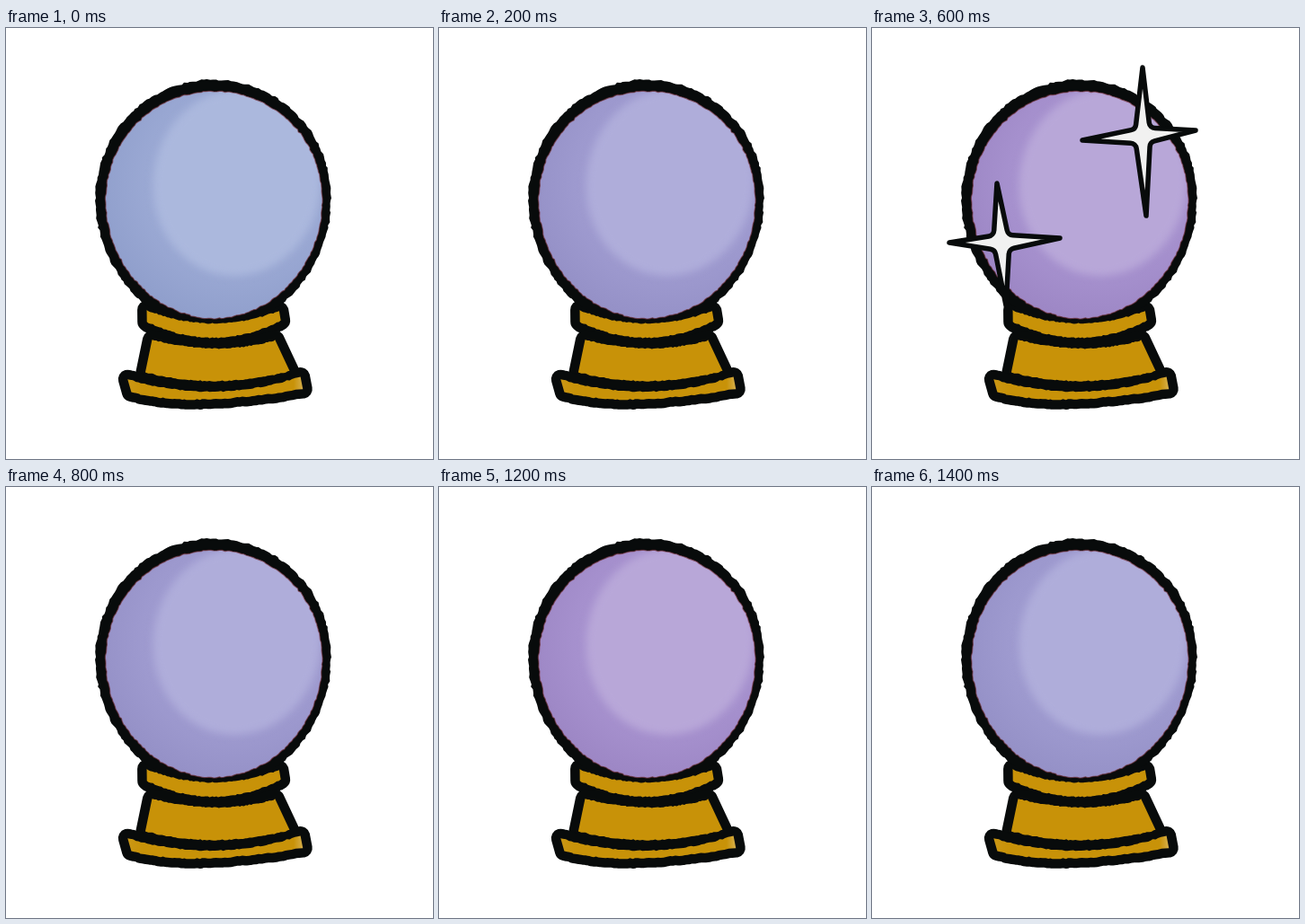
These frames come from a looping animation (475 px wide and 480 px high, 1.6 s). An HTML page with a canvas:

```html
<!DOCTYPE html>
<html lang="en">
<head>
<meta charset="utf-8">
<title>Crystal ball</title>
<style>
html, body { margin: 0; width: 100%; height: 100%; overflow: hidden; background: #fff; }
canvas { display: block; }
</style>
</head>
<body>
<canvas id="stage" width="475" height="480"></canvas>
<script>
const ctx = document.getElementById('stage').getContext('2d');
const INK = '#080b0b';
const STEP = 200;

// light, shade and deep tone of the glass
const BLUE = ['#abb8dd', '#9ba9d4', '#909fcc'];
const VIOLET = ['#afadda', '#9f9bd0', '#9591c7'];
const PURPLE = ['#b8a7d8', '#a792cf', '#9d87c5'];
const tones = [BLUE, VIOLET, PURPLE, PURPLE, VIOLET, PURPLE, PURPLE, VIOLET];
const sparkles = step => step === 3 || step === 5;

let seed = 77;
const rnd = () => (seed = seed * 16807 % 2147483647) / 2147483647 - 0.5;

// Closed path along at(t), t from 0 to 1, with an uneven hand-inked edge
function trace(at, steps, rough) {
  const path = new Path2D();
  for (let i = 0; i < steps; i++) {
    const [x, y] = at(i / steps);
    path.lineTo(x + rnd() * rough, y + rnd() * rough);
  }
  path.closePath();
  return path;
}

// Ellipse that is a little fuller at the top
const egg = (cx, cy, rx, ry, rough) => trace(t => {
  const a = t * 2 * Math.PI;
  return [cx + rx * Math.cos(a) * (1 - 0.035 * Math.sin(a)), cy + ry * Math.sin(a)];
}, 260, rough);

const quad = (a, b, c, t) =>
  [0, 1].map(k => (1 - t) ** 2 * a[k] + 2 * t * (1 - t) * b[k] + t * t * c[k]);

// Ring of the stand: sagging top edge, then sagging bottom edge back
const ring = (top, bottom) => trace(
  t => t < 0.5 ? quad(...top, t * 2) : quad(...bottom, t * 2 - 1), 130, 1.2);

const rim = egg(230.5, 196, 131, 138.5, 1.8);
const glass = egg(231.5, 197, 120.5, 126.5, 1.3);
const rings = [
  ring([[156, 314], [231, 344], [306, 314]], [[306, 326], [231, 364], [154, 326]]),
  ring([[163, 347], [236, 367], [301, 347]], [[316, 382], [235, 404], [153, 383]]),
  ring([[135, 391], [236, 421], [330, 387]], [[330, 402], [200, 424], [138, 405]])
];

const gold = ctx.createLinearGradient(132, 0, 334, 0);
gold.addColorStop(0, '#cb9817');
gold.addColorStop(0.1, '#c89208');
gold.addColorStop(0.93, '#c89208');
gold.addColorStop(1, '#dab963');

function fill(path, style) {
  ctx.fillStyle = style;
  ctx.fill(path);
}

function stroke(path, style, width) {
  ctx.lineJoin = 'round';
  ctx.lineWidth = width;
  ctx.strokeStyle = style;
  ctx.stroke(path);
}

function drawGlass([light, shade, deep]) {
  const wash = ctx.createRadialGradient(255, 172, 95, 255, 172, 155);
  wash.addColorStop(0, shade);
  wash.addColorStop(1, deep);
  fill(glass, wash);

  ctx.save();
  ctx.clip(glass);
  ctx.filter = 'blur(4px)';
  const glow = new Path2D();
  glow.ellipse(257, 172, 93, 104, 0.15, 0, 2 * Math.PI);
  fill(glow, light);
  ctx.restore();
  stroke(glass, 'rgba(112,48,56,.65)', 1.2);
}

// Four straight spikes with rounded inner corners
function drawStar(center, tips, gap) {
  const reach = tips.map(([x, y]) => {
    const dx = x - center[0], dy = y - center[1], len = Math.hypot(dx, dy);
    return [dx * gap / len, dy * gap / len];
  });
  const star = new Path2D();
  star.moveTo(...tips[0]);
  tips.forEach((_, i) => {
    const j = (i + 1) % tips.length;
    const corner = [0, 1].map(k => center[k] + reach[i][k] + reach[j][k]);
    star.arcTo(...corner, ...tips[j], 7);
    star.lineTo(...tips[j]);
  });
  star.closePath();
  fill(star, '#f1f1f0');
  stroke(star, INK, 5.5);
}

function draw(step) {
  ctx.fillStyle = '#fff';
  ctx.fillRect(0, 0, 475, 480);
  rings.forEach(r => stroke(r, INK, 21));
  fill(rim, INK);
  drawGlass(tones[step]);
  rings.forEach(r => fill(r, gold));
  if (!sparkles(step)) return;
  drawStar([301, 120], [[301, 44], [360, 114], [305, 209], [234, 125]], 8);
  drawStar([144, 239], [[139, 173], [209, 234], [149, 309], [86, 239]], 8);
}

let shown = -1;
function tick() {
  const step = Math.floor(performance.now() / STEP) % tones.length;
  if (step !== shown) draw(shown = step);
  requestAnimationFrame(tick);
}
tick();
</script>
</body>
</html>
```
